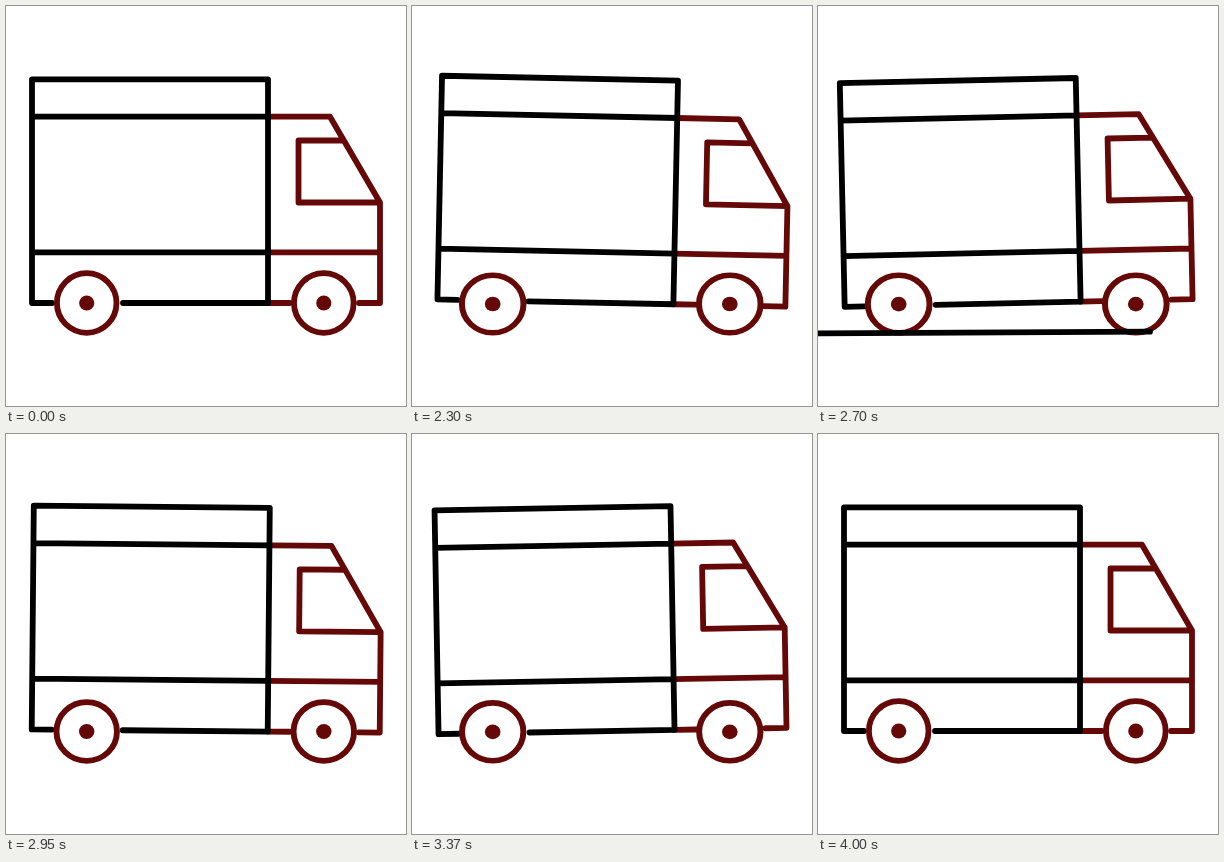
Recreate the animation shown at these times as an HTML page. Size 400 by 400 pixels, loop 4020 ms.

```html
<!DOCTYPE html>
<html lang="en">
<head>
<meta charset="utf-8">
<title>Truck</title>
<style>
  html, body { margin: 0; width: 100%; height: 100%; overflow: hidden; background: #fff; }
  svg { display: block; width: 100vw; height: 100vh; }
  .line { fill: none; stroke-width: 5.8; stroke-linecap: round; stroke-linejoin: round; }
  .red { stroke: #650808; }
  .black { stroke: #000; }
  .hub { fill: #650808; }
</style>
</head>
<body>
<svg viewBox="0 0 400 400">
  <g id="body">
    <path class="line red" d="M262 110.7H324L374 196.5V297H353M337 134.5H292.5V196.5H374M262 246.3H374M262 297H284"/>
    <path class="line black" d="M46 297H26V73.3H262V297H117M26 110.7H262M26 246.3H262"/>
  </g>
  <g class="wheel"><circle class="line red" cx="80.7" cy="297" r="29.8"/><circle class="hub" cx="80.7" cy="297" r="7.6"/></g>
  <g class="wheel"><circle class="line red" cx="317.8" cy="297" r="29.8"/><circle class="hub" cx="317.8" cy="297" r="7.6"/></g>
  <line id="road" class="line black"/>
</svg>
<script>
  const LOOP = 4020, START = 2020, TILT = 1.27;
  // [time in ms, tilt in degrees]
  const rock = [[2000, 0], [2360, TILT], [2720, -TILT], [3080, TILT], [3440, -TILT], [4000, 0]];
  // Road streak: one pass each period, moving left
  const PERIOD = 500, PASSES = 3, SPEED = 4, LENGTH = 636;

  const body = document.getElementById('body');
  const road = document.getElementById('road');
  const wheels = [...document.querySelectorAll('.wheel')];
  const ease = p => p * p * (3 - 2 * p);
  const roadY = x => 327.3 - 0.0048 * x;

  function tiltAt(t) {
    if (t < START) return 0;
    for (let i = 1; i < rock.length; i++) {
      const [t0, a] = rock[i - 1], [t1, b] = rock[i];
      if (t < t1) return a + (b - a) * ease((t - t0) / (t1 - t0));
    }
    return 0;
  }

  function drawRoad(t) {
    const run = t - 2000;
    const right = 336 - SPEED * (run % PERIOD - 200);
    const left = right - LENGTH;
    const shown = t >= START && run < PERIOD * PASSES && left < 403 && right > -3;
    road.style.display = shown ? '' : 'none';
    if (!shown) return;
    const ends = { x1: left, y1: roadY(left), x2: right, y2: roadY(right) };
    for (const key in ends) road.setAttribute(key, ends[key]);
  }

  function draw(t) {
    const tilt = tiltAt(t);
    const squash = 0.036 * Math.abs(tilt) / TILT;
    body.setAttribute('transform', `rotate(${tilt} 200 268)`);
    wheels.forEach(wheel => {
      const x = wheel.firstChild.getAttribute('cx');
      wheel.setAttribute('transform',
        `translate(${x} 327) scale(${1 + squash} ${1 - squash}) translate(${-x} -327)`);
    });
    drawRoad(t);
  }

  const begin = performance.now();
  function tick() {
    draw((performance.now() - begin) % LOOP);
    requestAnimationFrame(tick);
  }
  tick();
</script>
</body>
</html>
```
